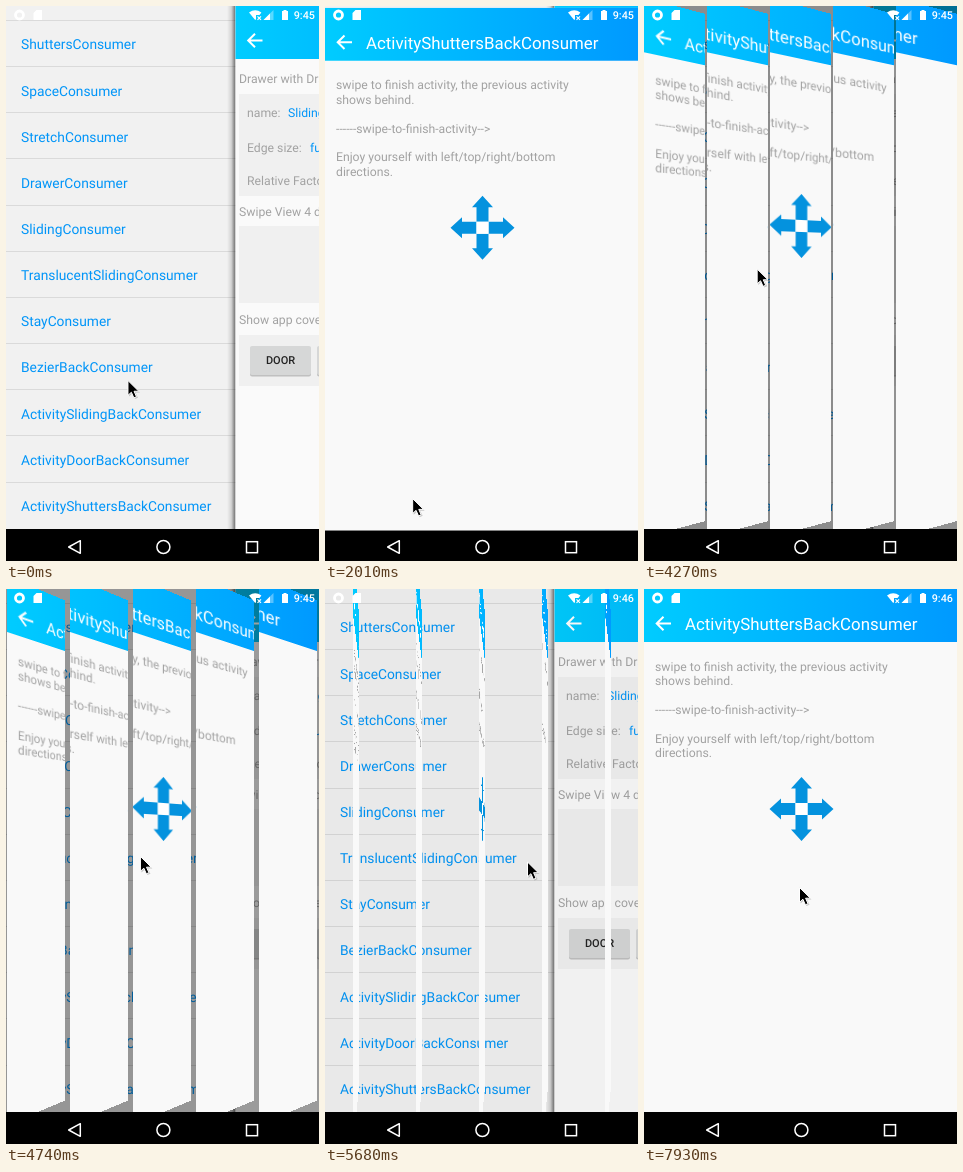
These frames come from a looping animation (313x555 px, 8 s). An HTML page:

```html
<!DOCTYPE html>
<html lang="en">
<head>
<meta charset="utf-8">
<title>Shutters back</title>
<style>
html, body { margin: 0; width: 100%; height: 100%; overflow: hidden; background: #000; }
#stage { position: relative; width: 313px; height: 555px; overflow: hidden; font-family: Roboto, sans-serif; }
#stage > * { position: absolute; left: 0; top: 0; }
svg { display: block; overflow: hidden; text-rendering: geometricPrecision; white-space: pre; }
#scrim { width: 313px; height: 523px; background: #000; }
#slats { width: 313px; height: 523px; overflow: hidden; }
#slats svg { position: absolute; top: 0; transform-origin: 50% 50%; }
.row { font-size: 13.8px; fill: #0095f8; }
.title { font-size: 16.85px; fill: #fff; }
.body { font-size: 12.22px; fill: #a2a2a2; }
.blue { fill: #0095f8; }
.btn { font-size: 11px; font-weight: 500; fill: #222; }
.clock { font-size: 10.8px; font-weight: 500; fill: #fff; }
.line { fill: none; stroke: #fff; }
</style>
</head>
<body>
<div id="stage"></div>
<script>
const W = 313, H = 555, VIEW = 523, LEAVES = 5, LEAF = Math.ceil(W / LEAVES);
const STEP = 118.36, LOOP = 8000;
const OPEN = [1849, 6950], DRAG = 3555, GONE = 5910, MINUTE = 5300;

const svg = (x, w, h, inner, id = '') =>
  `<svg id="${id}" width="${w}" height="${h}" viewBox="${x} 0 ${w} ${h}">${inner}</svg>`;
const rect = (x, y, w, h, fill, more = '') =>
  `<rect x="${x}" y="${y}" width="${w}" height="${h}" fill="${fill}" ${more}/>`;
const text = (x, y, cls, s, more = '') => `<text x="${x}" y="${y}" class="${cls}" ${more}>${s}</text>`;

// Slightly wider than the stage, since the leaves are rounded up
const WIDE = LEAF * LEAVES;
const bar = rect(0, 0, WIDE, 53, 'url(#sky)') +
  '<path class="line" stroke-width="2" d="M27 34.5H13M19.5 27.7L12.7 34.5l6.8 6.8"/>';

// Drawer list with the shifted main page on its right
const rows = ['Shutters', 'Space', 'Stretch', 'Drawer', 'Sliding', 'TranslucentSliding', 'Stay',
  'BezierBack', 'ActivitySlidingBack', 'ActivityDoorBack', 'ActivityShuttersBack'];
const PITCH = 46.15;
const drawer = rect(0, 0, 230, VIEW, '#f1f1f1') +
  rows.map((name, i) =>
    rect(0, 14 + Math.round(i * PITCH), 230, 1, '#dadada') +
    text(15, 43.4 + i * PITCH, 'row', name + 'Consumer')).join('') +
  rect(0, 477, 229, 46, '#000', 'id="press" opacity=".08"') +
  rect(221, 0, 8.5, VIEW, 'url(#edge)');

const button = x => rect(x, 341, 61, 29.5, '#c0c0c0', 'rx="2"') + rect(x, 340, 61, 29, '#d6d7d7', 'rx="2"');
const main = rect(229.5, 0, 90, VIEW, '#fafafa') +
  `<g transform="translate(229.5)">${bar}</g>` +
  rect(233, 88, 90, 102, '#f0f0f0') + rect(233, 220, 90, 77, '#f0f0f0') + rect(233, 329, 90, 51, '#f0f0f0') +
  text(233, 77.4, 'body', 'Drawer with Drawer') +
  text(241, 111.2, 'body', 'name:') + text(282, 111.2, 'body blue', 'SlidingConsumer') +
  text(241, 146.4, 'body', 'Edge size:') + text(304, 146.4, 'body blue', 'full') +
  text(241, 178.6, 'body', 'Relative Factor:') +
  text(233, 209.8, 'body', 'Swipe View 4 directions') +
  text(233, 317.6, 'body', 'Show app cover') +
  button(244) + button(311) + text(274.5, 358, 'btn', 'DOOR', 'text-anchor="middle"');

const defs = `<defs>
<linearGradient id="sky"><stop stop-color="#00ccff"/><stop offset="1" stop-color="#0099ff"/></linearGradient>
<linearGradient id="edge"><stop stop-opacity="0"/><stop offset=".5" stop-opacity=".12"/><stop offset="1" stop-opacity=".55"/></linearGradient>
</defs>`;

// Page that opens on top
const lines = ['swipe to finish activity, the previous activity', 'shows behind.', '',
  '------swipe-to-finish-activity--&gt;', '', 'Enjoy yourself with left/top/right/bottom', 'directions.'];
const arm = 'M0-32L10.5-20.5H6V-6H-6V-20.5H-10.5Z';
const page = rect(0, 0, WIDE, VIEW, '#f9f9f9') + bar +
  text(41, 40.8, 'title', 'ActivityShuttersBackConsumer') +
  lines.map((s, i) => text(11, 81.5 + i * 14.45, 'body', s)).join('') +
  '<g transform="translate(157.5 220)" fill="#0492de">' +
  [0, 90, 180, 270].map(a => `<path d="${arm}" transform="rotate(${a})"/>`).join('') +
  rect(-6, -6, 12, 12, '#fff') + '</g>';

const system = '<circle cx="13.5" cy="9" r="4" class="line" stroke-width="2.8"/>' +
  '<path fill="#fff" d="M30.5 4H36V14H27.5V7Z"/>' +
  '<path fill="#fff" d="M243 6.5Q249.2 1.8 255.4 6.5L253.5 9H250V13.3L249.2 14Z"/>' +
  '<path class="line" stroke-width="1.2" d="M251.5 10.3l3.5 3.5M255 10.3l-3.5 3.5"/>' +
  '<path fill="#fff" opacity=".35" d="M267.5 4V14H257.5Z"/><path fill="#fff" d="M264 7.5V14H257.5Z"/>' +
  '<path fill="#fff" d="M277.5 4H280.5V5H282V14H276V5H277.5Z"/>' +
  text(309, 13, 'clock', '9:45', 'id="clock" text-anchor="end"') +
  '<path class="line" stroke-width="1.5" stroke-linejoin="round" d="M62.7 541L74.3 534.7V547.3Z"/>' +
  '<circle class="line" stroke-width="1.5" cx="157.4" cy="541" r="6.5"/>' +
  '<rect class="line" stroke-width="1.5" x="240.5" y="535.7" width="11" height="11"/>' +
  '<g id="cursor"><path d="M1 1.5V16L4.5 13 7 18.5 10 17.2 7.5 12H12Z" opacity=".2"/>' +
  '<path d="M0 0V14.8L3.4 11.7 5.9 17.3 8.5 16.2 6.1 10.7H10.8Z" stroke="#fff" stroke-width="1"/></g>';

const $ = id => document.getElementById(id);
$('stage').innerHTML =
  svg(0, W, H, defs + drawer + main + rect(0, VIEW, W, 32, '#000'), 'base') +
  '<div id="scrim"></div>' +
  svg(0, W, H, page + rect(0, VIEW, W, 32, '#000'), 'win') +
  '<div id="slats">' +
  Array.from({ length: LEAVES }, (_, i) => svg(i * LEAF, LEAF, VIEW, page)).join('') + '</div>' +
  svg(0, W, H, system, 'system');

const leaves = [...$('slats').children];
leaves.forEach((leaf, i) => leaf.style.left = i * LEAF + 'px');

// time, x, y
const path = [[0, 122, 374.5], [120, 121, 376], [830, 67.5, 451], [1300, 87.5, 494], [1420, 87.5, 494],
  [1540, 86, 494], [1660, 87.5, 494], [2012, 87.5, 494], [2600, 112, 303], [2960, 132, 192],
  [3200, 67, 238], [3560, 72.5, 255.5], [4150, 108, 262], [4740, 134.5, 267.5], [5300, 202.5, 273],
  [6050, 202.5, 273], [6870, 61, 500.5], [6990, 61, 500.5], [7690, 199, 299], [7930, 155.5, 298.5]];
// time, share of the quarter turn
const turn = [[DRAG, 0], [4150, .14], [4740, .24], [5300, .5], [5680, .93], [5800, .985], [GONE, 1]];

function at(keys, t) {
  const i = keys.findIndex(k => k[0] > t);
  if (i < 0) return keys[keys.length - 1].slice(1);
  if (!i) return keys[0].slice(1);
  const a = keys[i - 1], b = keys[i], u = (t - a[0]) / (b[0] - a[0]);
  return a.slice(1).map((v, j) => v + (b[j + 1] - v) * u);
}
const show = (el, on) => el.style.display = on ? '' : 'none';
const rest = (t, span, power) => Math.max(0, 1 - t / span) ** power;

function draw(t) {
  const folding = t >= DRAG && t < GONE;
  const opened = t >= OPEN[1] ? OPEN[1] : OPEN[0];
  const age = t - opened;
  const open = age >= 0 && (t < DRAG || opened === OPEN[1]);

  show($('win'), open);
  if (open) {
    $('win').style.opacity = 1 - rest(age, 200, 4);
    $('win').style.transform = `translateY(${H * .08 * rest(age, 350, 5)}px)`;
  }

  show($('slats'), folding);
  show($('scrim'), folding);
  if (folding) {
    const [p] = at(turn, t);
    $('scrim').style.opacity = .5 * (1 - p);
    for (const leaf of leaves) leaf.style.transform = `perspective(250px) rotateY(${90 * p}deg)`;
  }

  show($('press'), t > 6800 && t < OPEN[1]);
  $('clock').textContent = t < MINUTE ? '9:45' : '9:46';
  $('cursor').setAttribute('transform', `translate(${at(path, t)})`);
}

// The screen refreshes in even steps
const start = performance.now();
function tick() {
  const t = (performance.now() - start) % LOOP;
  draw(Math.floor((t + 4) / STEP) * STEP + 4);
  requestAnimationFrame(tick);
}
tick();
</script>
</body>
</html>
```
